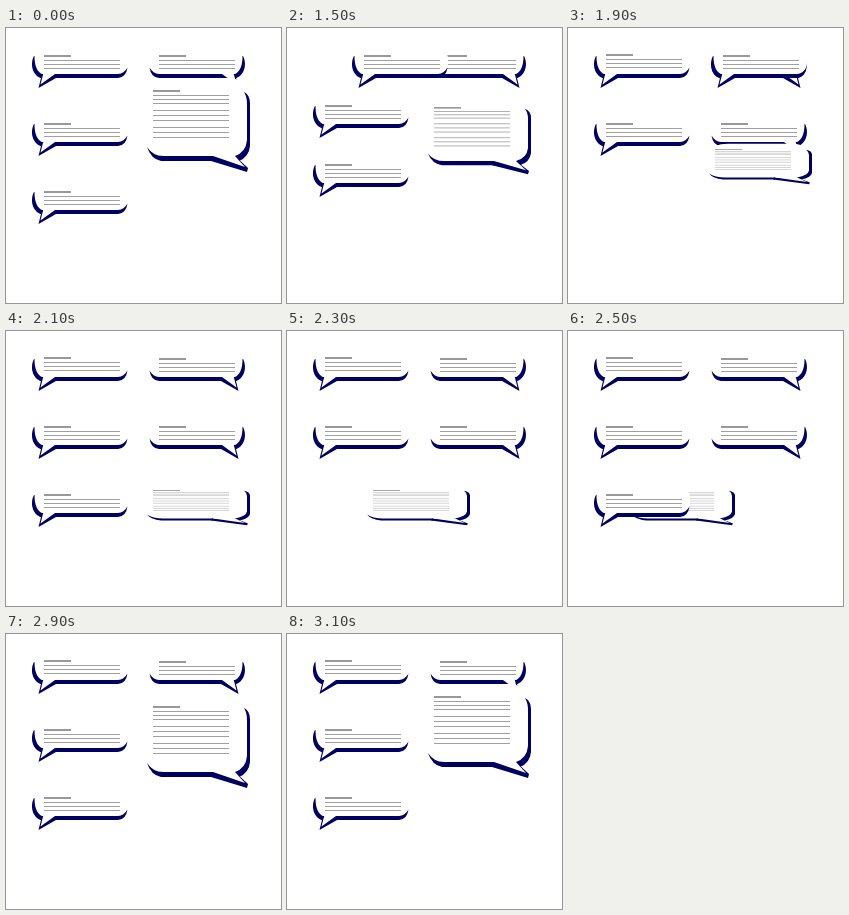
Write an HTML page with a canvas that moves like this. It is 275 by 275 pixels and loops after 3600 ms.

```html
<!DOCTYPE html>
<html>
<head>
<meta charset="utf-8">
<style>
html, body { margin: 0; width: 100%; height: 100%; overflow: hidden; background: #fff; }
canvas { display: block; width: 275px; height: 275px; }
</style>
</head>
<body>
<canvas id="stage" width="275" height="275"></canvas>
<script>
const ctx = document.getElementById('stage').getContext('2d');
const NAVY = '#000060', LOOP = 3600, ROW = 68;

function fill(color, d) {
  ctx.fillStyle = color;
  ctx.fill(new Path2D(d));
}

function rounded(x, y, w, h, r) {
  ctx.fillStyle = '#fff';
  ctx.beginPath();
  ctx.roundRect(x, y, w, h, r);
  ctx.fill();
}

function note(x, y, lines) {
  ctx.fillStyle = '#999';
  ctx.fillRect(x, y, 27, 2);
  ctx.fillStyle = '#a0a0a0';
  for (const dy of lines) ctx.fillRect(x, y + dy, 76, 1);
}

function at(x, y, sx, sy, draw) {
  ctx.save();
  ctx.translate(x, y);
  ctx.scale(sx, sy);
  draw();
  ctx.restore();
}

// Small bubble with its tail at the lower left
function shell() {
  rounded(28, 19, 94, 28, 12);
  fill(NAVY, 'M28 28 C25 33 24 46 35.5 50.5 L37 46.5 C31 44 28.5 38 28.5 28 Z');
  fill(NAVY, 'M49 46 L112 46 Q118 45.5 121.5 39.5 Q120 49.5 112 50 L49 50 Z');
  fill(NAVY, 'M36 46 L32.5 60 L50 50 L50 46 Z');
  fill('#fff', 'M37.5 45 L34.5 56.5 L49 46 L49 45 Z');
}

function left(x, y) {
  at(x, Math.round(y), 1, 1, shell);
  note(38 + x, 27 + Math.floor(y), [5, 9, 13]);
}

function right(y) {
  at(265, y, -1, 1, shell);
  note(153, 27 + y, [5, 9, 13]);
}

// Big bubble; y is the heading's height, s squeezes it vertically
function big(x, y, s) {
  at(x, y, 1, s, () => {
    rounded(142, -12, 99, 79, 18);
    fill(NAVY, 'M238 2 Q244 5 244 13 L244 56 Q243 67 233 71 L229 66 Q240 62 241 50 L241 14 Q241 7 238 2 Z');
    fill(NAVY, 'M141 57 Q147 66 157 66 L207 66 L207 71 L155 71 Q145 69 141 57 Z');
    fill(NAVY, 'M206 66 L229 66 L242 78 L241 82 L205 71 Z');
    fill('#fff', 'M208 65 L228 65 L239 77 L207 66 Z');
    note(147, 0, [5, 9, 13, 20, 25, 30, 37, 42, 47]);
  });
}

const rest = { l: [[0, 0], [0, ROW], [0, 2 * ROW]], r: [0], b: [0, 62, 1] };
const pair = [[0, -0.5], [0, ROW]];
const full = [...pair, [0, 2 * ROW]];

// Bubbles flow through the columns in held steps
const poses = [
  [0, rest],
  [1500, { l: [[0, 109], [0, 50], [39, 0]], r: [0], b: [0, 79, 0.82] }],
  [1700, { l: [[0, 88], [0, 25], [78, 0]], r: [34], b: [0, 100, 0.63] }],
  [1900, { l: [...pair, [117, 0]], r: [0, ROW], b: [0, 121, 0.43] }],
  [2100, { l: full, r: [0, ROW], b: [0, 159, 0.43] }],
  [2300, { l: pair, r: [0, ROW], b: [-61, 159, 0.43] }],
  [2500, { l: full, r: [0, ROW], b: [-77, 159, 0.43] }],
  [2700, { l: full, r: [0, ROW], b: [-77, 137, 1] }],
  [2800, { l: full, r: [0, ROW], b: [-38, 104, 1] }],
  [2900, { l: full, r: [0], b: [0, 72, 1] }],
  [3000, { l: full, r: [0], b: [2, 67, 1] }],
  [3100, { l: full, r: [0], b: [0, 62, 1] }]
];

function frame(now) {
  const t = now % LOOP;
  let pose = rest;
  for (const [start, p] of poses) if (t >= start) pose = p;
  ctx.fillStyle = '#fff';
  ctx.fillRect(0, 0, 275, 275);
  pose.r.forEach(right);
  big(...pose.b);
  pose.l.forEach(p => left(...p));
  requestAnimationFrame(frame);
}

frame(0);
</script>
</body>
</html>
```
